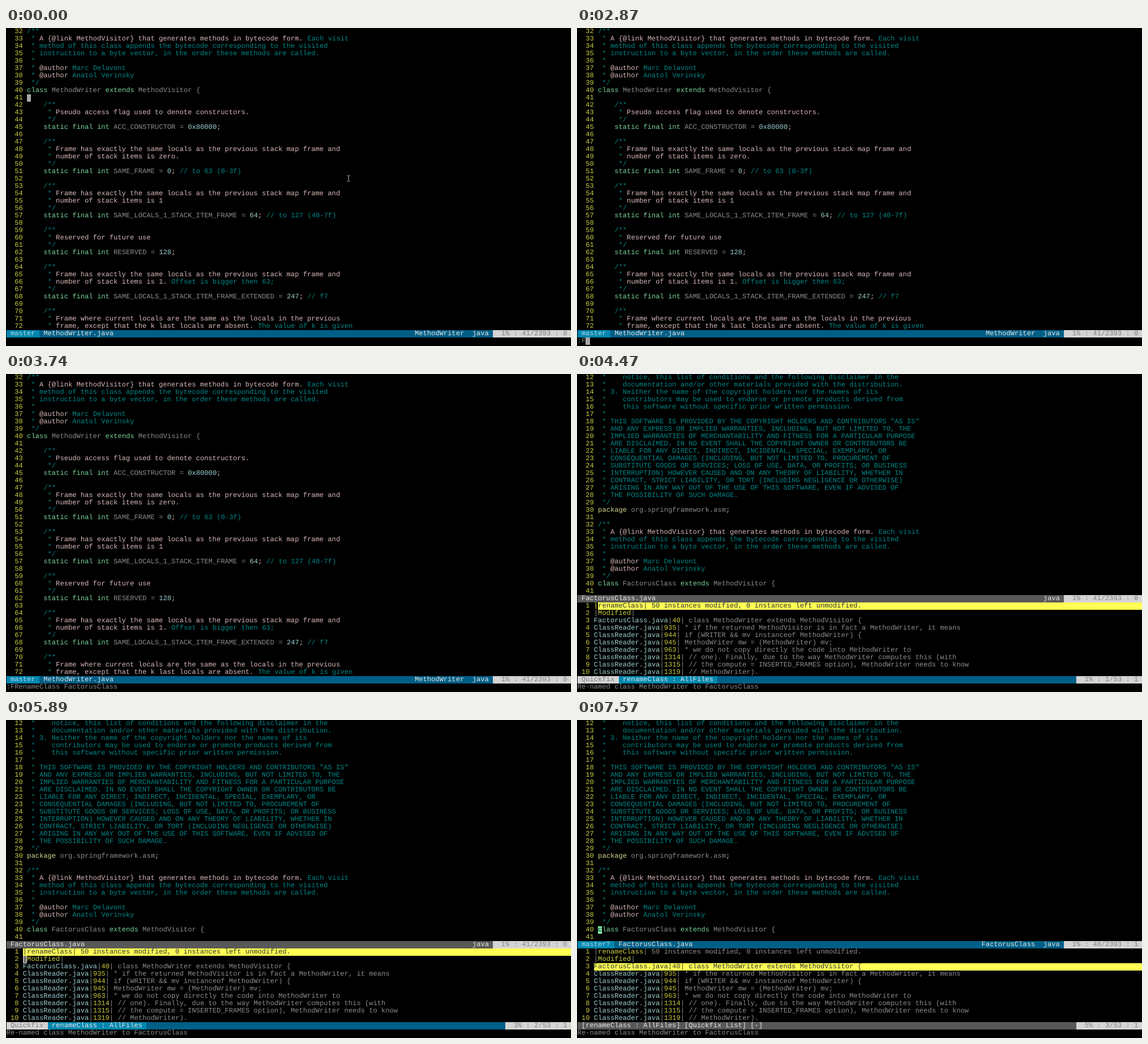
Animation, 998 px wide and 561 px high, one loop 9880 ms. Source, as an HTML page:

```html
<!DOCTYPE html>
<html lang="en">
<head>
<meta charset="utf-8">
<title>Renaming a class</title>
<style>
html, body { margin: 0; width: 100%; height: 100%; overflow: hidden; background: #000; }
#stage { position: relative; width: 998px; height: 561px; overflow: hidden; background: #000; }
.screen { position: absolute; inset: 0; }
.screen[hidden] { display: none; }
.screen span {
  position: absolute; height: 13px; white-space: pre;
  font: 12.141px/12px "Liberation Mono", "Courier New", monospace;
  font-variant-ligatures: none; text-rendering: geometricPrecision;
}
svg { position: absolute; left: 600px; top: 258px; }
</style>
</head>
<body>
<div id="stage"></div>
<script>
const COLS = 137, CELL_W = 998 / COLS, CELL_H = 13, PAD = 0.7, LOOP = 9880;

const C = {
  normal: '#8c8c8c', comment: '#008787', special: '#d9b8b8', keyword: '#78d59a',
  value: '#9ccfcf', pre: '#d6d690', number: '#cccc40',
  cursor: '#a8a8a8', mint: '#87ffaf', ice: '#afffff',
  blue: '#0087af', navy: '#005f87', light: '#d4d4d4', dim: '#808080',
  grey: '#585858', yellow: '#ffff55', white: '#e6e6e6', pale: '#b4d8e6', ink: '#333'
};

// "^" switches between comment and special colour inside a comment
const SOURCE = `/**^*
 * ^ASM: a very small and fast Java bytecode manipulation framework
 * ^Copyright (c) 2000-2011 OLVEX, Corvane Reseau
 * ^All rights reserved.
 *
 * Redistribution and use in source and binary forms, with or without
 * modification, are permitted provided that the following conditions
 * are met:
 * 1. Redistributions of source code must retain the above copyright
 *    notice, this list of conditions and the following disclaimer.
 * 2. Redistributions in binary form must reproduce the above copyright
 *    notice, this list of conditions and the following disclaimer in the
 *    documentation and/or other materials provided with the distribution.
 * 3. Neither the name of the copyright holders nor the names of its
 *    contributors may be used to endorse or promote products derived from
 *    this software without specific prior written permission.
 *
 * THIS SOFTWARE IS PROVIDED BY THE COPYRIGHT HOLDERS AND CONTRIBUTORS "AS IS"
 * AND ANY EXPRESS OR IMPLIED WARRANTIES, INCLUDING, BUT NOT LIMITED TO, THE
 * IMPLIED WARRANTIES OF MERCHANTABILITY AND FITNESS FOR A PARTICULAR PURPOSE
 * ARE DISCLAIMED. IN NO EVENT SHALL THE COPYRIGHT OWNER OR CONTRIBUTORS BE
 * LIABLE FOR ANY DIRECT, INDIRECT, INCIDENTAL, SPECIAL, EXEMPLARY, OR
 * CONSEQUENTIAL DAMAGES (INCLUDING, BUT NOT LIMITED TO, PROCUREMENT OF
 * SUBSTITUTE GOODS OR SERVICES; LOSS OF USE, DATA, OR PROFITS; OR BUSINESS
 * INTERRUPTION) HOWEVER CAUSED AND ON ANY THEORY OF LIABILITY, WHETHER IN
 * CONTRACT, STRICT LIABILITY, OR TORT (INCLUDING NEGLIGENCE OR OTHERWISE)
 * ARISING IN ANY WAY OUT OF THE USE OF THIS SOFTWARE, EVEN IF ADVISED OF
 * THE POSSIBILITY OF SUCH DAMAGE.
 */
package org.springframework.asm;

/**
 * ^A {@link MethodVisitor} that generates methods in bytecode form.^ Each visit
 * method of this class appends the bytecode corresponding to the visited
 * instruction to a byte vector, in the order these methods are called.
 *
 * ^@author^ Marc Delavont
 * ^@author^ Anatol Verinsky
 */
class $CLASS extends MethodVisitor {

    /**
     * ^Pseudo access flag used to denote constructors.
     */
    static final int ACC_CONSTRUCTOR = 0x80000;

    /**
     * ^Frame has exactly the same locals as the previous stack map frame and
     * ^number of stack items is zero.
     */
    static final int SAME_FRAME = 0; // to 63 (0-3f)

    /**
     * ^Frame has exactly the same locals as the previous stack map frame and
     * ^number of stack items is 1
     */
    static final int SAME_LOCALS_1_STACK_ITEM_FRAME = 64; // to 127 (40-7f)

    /**
     * ^Reserved for future use
     */
    static final int RESERVED = 128;

    /**
     * ^Frame has exactly the same locals as the previous stack map frame and
     * ^number of stack items is 1.^ Offset is bigger then 63;
     */
    static final int SAME_LOCALS_1_STACK_ITEM_FRAME_EXTENDED = 247; // f7

    /**
     * ^Frame where current locals are the same as the locals in the previous
     * ^frame, except that the k last locals are absent.^ The value of k is given`.split('\n');

const RESULTS = `|renameClass| 50 instances modified, 0 instances left unmodified.
|Modified|
FactorusClass.java|40| class MethodWriter extends MethodVisitor {
ClassReader.java|935| * if the returned MethodVisitor is in fact a MethodWriter, it means
ClassReader.java|944| if (WRITER && mv instanceof MethodWriter) {
ClassReader.java|945| MethodWriter mw = (MethodWriter) mv;
ClassReader.java|963| * we do not copy directly the code into MethodWriter to
ClassReader.java|1314| // one). Finally, due to the way MethodWriter computes this (with
ClassReader.java|1315| // the compute = INSERTED_FRAMES option), MethodWriter needs to know
ClassReader.java|1319| // MethodWriter).`.split('\n');

const stage = document.getElementById('stage');
let screen;

function put(row, col, text, color, bg, cols = text.length) {
  const s = document.createElement('span');
  s.textContent = text;
  s.style.left = PAD + col * CELL_W + 'px';
  s.style.top = row * CELL_H + 'px';
  s.style.color = color;
  if (bg) {
    s.style.background = bg;
    s.style.width = cols * CELL_W + 'px';
  }
  screen.append(s);
  return col + cols;
}

const cursor = (row, col, char = ' ', bg = C.cursor, color = '#000') => put(row, col, char, color, bg);

function tokens(line) {
  if (/^\s*(\/\*|\*)/.test(line))
    return line.split('^').map((t, i) => [t, i % 2 ? C.special : C.comment]);
  const parts = line.match(/\/\/.*|\b(?:0x)?\d+\b|\w+|;|[^\w;\/]+/g) || [];
  return parts.map(t => [t,
    t.startsWith('//') ? C.comment :
    /^(class|extends|static|final|int)$/.test(t) ? C.keyword :
    t === 'package' ? C.pre :
    /^\d/.test(t) ? C.value :
    t === ';' ? C.special : C.normal]);
}

function code(first, last, className) {
  for (let n = first; n <= last; n++) {
    const row = n - first;
    put(row, 0, String(n).padStart(4), C.number);
    let col = 5;
    for (const [text, color] of tokens(SOURCE[n - 1].replace('$CLASS', className)))
      col = put(row, col, text, color);
  }
}

// left: [text, colour, background] blocks; right: labels before the position box
function bar(row, left, right, position, bg) {
  put(row, 0, '', C.white, bg, COLS);
  let col = 0;
  for (const [text, color, back] of left) col = put(row, col, text, color, back);
  const start = COLS - 1 - position.length;
  put(row, start - 2, '  ' + position + ' ', C.dim, C.light);
  const label = right.join('  ');
  put(row, start - 3 - label.length - 1 + 1, label, C.white);
}

function fileBar(row, branch, name, labels, position) {
  bar(row, [[` ${branch} `, C.pale, C.blue], [` ${name}.java`, C.white]], labels, position, C.navy);
}

const message = text => put(42, 0, text, C.normal);

function results(selected) {
  RESULTS.forEach((line, i) => {
    const row = 31 + i;
    put(row, 0, String(i + 1).padStart(3), C.number);
    if (i === selected) {
      put(row, 4, line, C.ink, C.yellow, COLS - 4);
      return;
    }
    const [, file, pos, text] = line.match(/^([^|]*)\|([^|]*)\|(.*)$/);
    let col = put(row, 4, file, C.value);
    col = put(row, col, '|', C.normal);
    col = put(row, col, pos, C.number);
    put(row, col, '|' + text, C.normal);
  });
}

function pointer() {
  screen.insertAdjacentHTML('beforeend',
    '<svg width="10" height="15"><path d="M2.5 2.5H4L5 3.5L6 2.5H7.5M5 3.5V11.5M2.5 12.5H4L5 11.5L6 12.5H7.5" fill="none" stroke="#c8c8c8"/></svg>');
}

const DONE = 'Re-named class MethodWriter to FactorusClass';

function before(command, cursorCol) {
  code(32, 72, 'MethodWriter');
  fileBar(41, 'master', 'MethodWriter', ['MethodWriter', 'java'], '1% : 41/2393 : 0');
  message(command);
  if (cursorCol) cursor(42, cursorCol);
}

function idle(withPointer) {
  before('');
  cursor(9, 5);
  if (withPointer) pointer();
}

function renamed() {
  code(1, 41, 'FactorusClass');
  fileBar(41, 'master', 'FactorusClass', ['java'], '0% : 1/2393 : 1');
  message(DONE);
  cursor(42, DONE.length);
}

function list(line, percent, char, bg, color) {
  code(12, 41, 'FactorusClass');
  bar(30, [[' FactorusClass.java', C.white]], ['java'], '1% : 41/2393 : 0', C.grey);
  results(0);
  bar(41, [[' Quickfix ', C.dim, C.light], [' renameClass : AllFiles ', C.white, C.blue]],
    [], `${percent}% : ${line}/53 : 1`, C.navy);
  message(DONE);
  cursor(30 + line, 4, char, bg, color);
}

function jumped() {
  code(12, 41, 'FactorusClass');
  fileBar(30, 'master?', 'FactorusClass', ['FactorusClass', 'java'], '1% : 40/2393 : 1');
  results(2);
  bar(41, [[' [renameClass : AllFiles] [Quickfix List] [-]', C.white]], [], '5% : 3/53 : 1', C.grey);
  message(DONE);
  cursor(28, 5, 'c', C.mint);
}

const STEPS = [
  [0, () => idle(true)],
  [2400, () => idle(false)],
  [2440, () => before(':', 1)],
  [2870, () => before(':F', 2)],
  [3130, () => before(':FRenameClass FactorusClass', 27)],
  [3740, () => before(':FRenameClass FactorusClass')],
  [4310, renamed],
  [4470, () => list(1, 1, '|', '#000', C.yellow)],
  [5890, () => list(2, 3, '|')],
  [6630, () => list(3, 5, 'F', C.ice)],
  [7570, jumped]
];

const screens = STEPS.map(([, draw], i) => {
  screen = document.createElement('div');
  screen.className = 'screen';
  screen.hidden = i > 0;
  stage.append(screen);
  draw();
  return screen;
});

let shown = 0;
const began = performance.now();

function tick() {
  const t = (performance.now() - began) % LOOP;
  const now = STEPS.findLastIndex(([at]) => at <= t);
  if (now !== shown) {
    screens[shown].hidden = true;
    screens[now].hidden = false;
    shown = now;
  }
  requestAnimationFrame(tick);
}
tick();
</script>
</body>
</html>
```
